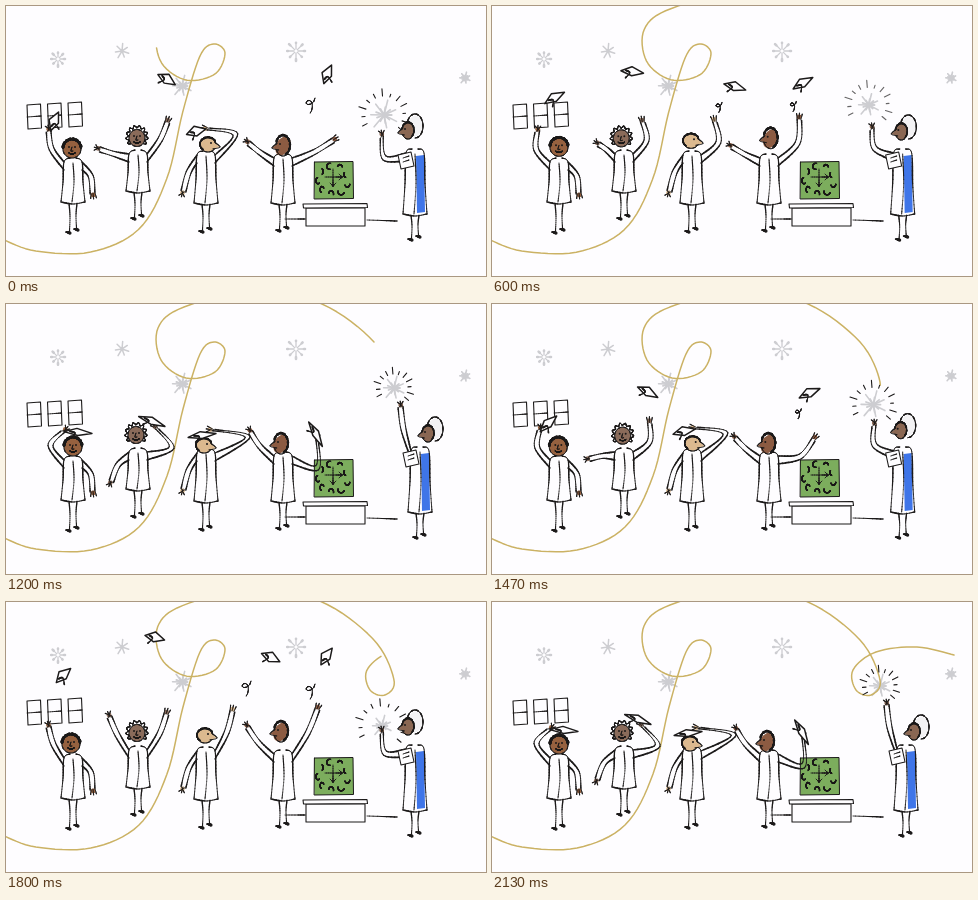
Animation of 480x270 px, one loop 2190 ms. Source, as an HTML page with a canvas:

```html
<!DOCTYPE html>
<html lang="en">
<head>
<meta charset="utf-8">
<title>Graduates</title>
<style>
html, body { margin: 0; width: 100%; height: 100%; overflow: hidden; background: #fefdff; }
canvas { display: block; width: 480px; height: 270px; }
</style>
</head>
<body>
<canvas width="480" height="270"></canvas>
<script>
const LOOP = 2190, PI = Math.PI, PAPER = '#fefdff', INK = '#1c1a1a', GREY = '#cdcdd1', GOLD = '#cbb264';
const ctx = document.querySelector('canvas').getContext('2d');
ctx.lineCap = ctx.lineJoin = 'round';

const lerp = (a, b, u) => a + (b - a) * u;
const range = (n, f) => Array.from({ length: n }, (_, i) => f(i));
let seed;
const random = () => (seed = seed * 16807 % 2147483647) / 2147483647;

// ---- Pen ----

// Smooth curve through flat x, y points, sampled up to the fractional index `end`.
function spline(xy, end = xy.length / 2 - 1) {
  const last = xy.length / 2 - 1, at = (i, c) => xy[2 * Math.max(0, Math.min(last, i)) + c];
  const point = t => [0, 1].map(c => {
    const i = Math.min(last - 1, Math.floor(t)), u = t - i;
    const [a, b, d, e] = [-1, 0, 1, 2].map(n => at(i + n, c));
    return b + u / 2 * (d - a + u * (2 * a - 5 * b + 4 * d - e + u * (3 * (b - d) + e - a)));
  });
  const steps = Math.ceil(end * 8);
  return range(steps + 1, i => point(end * i / steps));
}

// Brush line whose weight swells and thins along its length.
function pen(xy, width = 1.2, color = INK) {
  const pts = spline(xy);
  ctx.strokeStyle = color;
  for (let i = 1; i < pts.length; i++) {
    ctx.lineWidth = width * (1 + .3 * Math.sin(i * .45 + xy.length));
    ctx.beginPath();
    ctx.moveTo(...pts[i - 1]);
    ctx.lineTo(...pts[i]);
    ctx.stroke();
  }
}

function poly(points, fill = PAPER, width = 1.1) {
  ctx.beginPath();
  points.forEach(p => ctx.lineTo(...p));
  ctx.closePath();
  ctx.fillStyle = fill;
  ctx.fill();
  if (!width) return;
  ctx.strokeStyle = INK;
  ctx.lineWidth = width;
  ctx.stroke();
}
const box = (x, y, w, h, tilt, ...style) => poly([[x, y], [x + w, y - tilt], [x + w + tilt, y + h - tilt], [x + tilt, y + h]], ...style);

function blob(x, y, rx, ry, color, tilt = 0) {
  ctx.beginPath();
  ctx.ellipse(x, y, rx, ry, tilt, 0, 2 * PI);
  ctx.fillStyle = color;
  ctx.fill();
}

// Arc in units of pi, optionally curly.
function arc(x, y, rx, ry, from, to, width = 1, curls = 0) {
  const n = curls ? 40 : 14;
  pen(range(n + 1, i => {
    const a = PI * lerp(from, to, i / n), r = 1 + .12 * Math.sin(curls * a);
    return [x + rx * r * Math.cos(a), y + ry * r * Math.sin(a)];
  }).flat(), width);
}

function rays(x, y, inner, outer, count, color, width, from = 0, sweep = 2) {
  ctx.beginPath();
  for (let i = 0; i < count; i++) {
    const a = PI * (from + sweep * i / count), r = outer * (1 + .1 * Math.sin(i * 4));
    ctx.moveTo(x + inner * Math.cos(a), y + inner * Math.sin(a));
    ctx.lineTo(x + r * Math.cos(a), y + r * Math.sin(a));
  }
  ctx.strokeStyle = color;
  ctx.lineWidth = width;
  ctx.stroke();
}

// ---- Poses: swing, throw, wear, lift ----

let pose = 0;
function now(track) {
  const i = Math.floor(pose), a = track[i % 4] || track[0], b = track[(i + 1) % 4] || track[0];
  return a.map((n, c) => lerp(n, b[c], pose - i));
}

// Hands are x, y and elbow bend; caps x, y, angle; curls x, y, size; hair arc from, to, width, curls.
const people = [
  { x: [[67]], top: 156, hem: 196, foot: 225, skin: '#96613f', face: 0, size: [9, 9], hair: [1, 2, 2.4, 0],
    head: [[66, 143], [65, 142], [71, 140], [67, 143]],
    left: [[43, 125, 5], [43, 125, 3], [51, 126, 17], [58, 127, 13]],
    right: [[87, 187, -4]],
    cap: [[48, 115, -1.1], [57, 73, -.7], [73, 128, 0], [72, 128, .1]] },
  { x: [[132]], top: 148, hem: 185, foot: 211, skin: '#8a6b5a', face: 0, size: [8, 8.5], hair: [.75, 2.25, 1, 13],
    head: [[131, 132], [131, 131], [126, 135], [130, 131]],
    left: [[94, 143, 2], [104, 115, 2], [113, 184, -3], [105, 177, -3]],
    right: [[161, 116, 3], [160, 112, 3], [131, 124, 20], [150, 124, 21]],
    cap: [[161, 73, .6], [149, 35, .3], [123, 126, -.1], [146, 117, .4]] },
  { x: [[200]], top: 149, hem: 197, foot: 224, skin: '#dcb98f', face: 1, size: [8, 7], hair: [.7, 1.9, 1.3, 0],
    head: [[202, 139], [199, 134], [199, 138], [198, 142]],
    left: [[177, 185, -2]],
    right: [[201, 123, 25], [226, 109, 3], [215, 128, 27], [206, 126, 34]],
    cap: [[190, 125, -.2], [265, 55, .5], [199, 131, 0], [196, 131, -.1]],
    curl: [[190, 125, 0], [240, 84, 1], [200, 131, 0], [200, 131, 0]] },
  { x: [[277]], top: 152, hem: 197, foot: 223, skin: '#8c5b42', face: -1, size: [7, 10], hair: [1.1, 2.4, 1.8, 0], tilt: .5,
    head: [[277, 140], [275, 130], [286, 138], [275, 140]],
    left: [[243, 137, 2], [242, 125, 3], [236, 171, 0], [245, 128, 3]],
    right: [[327, 134, 3], [311, 107, 3], [299, 125, 23], [311, 136, 23]],
    cap: [[321, 68, -1.1], [320, 54, -.9], [292, 122, .4], [310, 130, 1.1]],
    curl: [[304, 97, 1], [304, 87, 1], [295, 122, 0], [310, 130, 0]] },
  { x: [[409], [409], [414], [414]], top: 147, hem: 208, foot: 232, skin: '#8a6753', face: -1, size: [6, 8], hair: [1, 2.3, 1.2, 0], teacher: true,
    head: [[402, 125], [402, 125], [424, 128], [422, 130]],
    left: [[376, 130, 16], [376, 130, 15], [389, 108, 2], [395, 103, 2]] },
];

function arm(side, x, y, [hx, hy, bend], skin) {
  const dx = hx - x, dy = hy - y, len = Math.hypot(dx, dy);
  const nx = -side * dy / len, ny = side * dx / len;
  const ex = (x + hx) / 2 + nx * bend, ey = (y + hy) / 2 + ny * bend;
  for (const edge of [-2, 3])
    pen([x, edge < 0 ? y : y + 8, ex + nx * edge, ey + ny * edge, hx + nx * edge, hy + ny * edge], 1.3);
  const aim = Math.atan2(hy - ey, hx - ex);
  blob(hx + 2 * Math.cos(aim), hy + 2 * Math.sin(aim), 2.4, 2.4, skin);
  for (const spread of [-.5, 0, .5])
    pen([hx + nx * spread * 4, hy + ny * spread * 4, hx + 6 * Math.cos(aim + spread), hy + 6 * Math.sin(aim + spread)], .9);
}

function drawHead(x, y, { skin, face, size: [rx, ry], hair, tilt = 0, teacher }) {
  if (teacher) {
    blob(x + 7, y - 5, 8, 11, '#f3f2f4', .3);
    arc(x + 7, y - 5, 8, 12, .9, 2.5, 1.1);
  }
  blob(x, y, rx, ry, skin, tilt);
  arc(x, y, rx, ry, 0, 2, .8);
  arc(x, y - 1, rx + hair[3] * .15, ry + hair[3] * .15, ...hair);
  if (face) {
    const tip = [x + face * (rx + 4), y + 2];
    poly([[x + face * rx * .7, y - 3], tip, [x + face * rx * .6, y + 4]], skin, 0);
    pen([x + face * rx * .8, y - 3, ...tip, x + face * rx * .6, y + 4], .9);
  } else {
    pen([x, y - 2, x - 1, y + 2, x + 1, y + 2], .8);
    arc(x, y + 2, 4, 3, .2, .8, .9);
    blob(x - 3, y - 2, 1, 1, INK);
  }
  blob(x + (face || 1) * 3, y - 2, 1, 1, INK);
}

function drawCap([x, y, angle]) {
  const flight = now([[1], [1], [0], [0]])[0], w = lerp(14, 10, flight), h = lerp(3.5, 5, flight);
  ctx.save();
  ctx.translate(x, y);
  ctx.rotate(angle);
  poly([[-w, h * .3], [-w * .1, -h], [w, 0], [0, h]], PAPER, 1.5);
  pen([-w * .6, 0, -w * .2, h * .4, -w * .5, h + 3], 1.4);
  ctx.restore();
}

function drawCurl([x, y, size]) {
  if (size < .1) return;
  pen(range(12, i => [x + size * (5 - i * .3) * Math.cos(i * .7), y + size * (i - 5 + 4 * Math.sin(i * .7))]).flat(), .9);
}

function drawPerson(p) {
  const [x] = now(p.x), [hx, hy] = now(p.head), { top, hem, foot } = p;
  if (p.teacher) box(x + 1, top + 3, 8, hem - top - 4, 1, '#3f75e8', 0);
  for (const side of [-1, 1]) {
    pen([x + side * 3, top - 4, x + side * 9, top, x + side * 10, (top + hem) / 2, x + side * 12, hem]);
    const end = foot - (side > 0 ? 3 : 0);
    pen([x + side * 4, hem + 1, x + side * 3, (hem + end) / 2, x + side * 3.5, end], 1);
    pen([x + side * 4 - 3, end + 1, x + side * 4 + 1, end + 2], 2.4);
  }
  pen([x - 12, hem, x, hem + 2, x + 12, hem]);
  pen([x, top + 1, x + 1, lerp(top, hem, .5), x - 1, hem], .9);
  drawHead(hx, hy, p);
  arm(-1, x - 9, top, now(p.left), p.skin);
  if (p.right) arm(1, x + 9, top, now(p.right), p.skin);
  if (p.cap) drawCap(now(p.cap));
  if (p.curl) drawCurl(now(p.curl));
  if (p.teacher) {
    box(x - 17, top + 2, 13, 14, 3);
    for (const line of [5, 9]) pen([x - 12, top + line, x - 6, top + line - 2], .9);
  }
}

// ---- Scene ----

function drawRoom() {
  for (let i = 0; i < 3; i++) {
    const x = 21 + i * 20.5, y = 99 - i;
    box(x, y, 13.5, 24, 1);
    pen([x, y + 12, x + 14, y + 11], 1);
  }
  pen([279, 213, 299, 213]);
  pen([361, 214, 391, 215]);
  box(300, 202, 59, 18, 0);
  box(297, 198, 64, 4, .5);
  box(308, 156, 39, 37, .5, '#7cad5d', 1);
  for (const [x, y] of [[1, 0], [0, 1]]) {
    pen([327 - 8 * x, 171 - 8 * y, 327 + 9 * x, 171 + 9 * y]);
    for (const s of [-3, 3]) pen([327 + 6 * x + s * y, 171 + 6 * y + s * x, 327 + 9 * x, 171 + 9 * y], 1);
  }
  seed = 11;
  for (let i = 0; i < 9; i++) {
    const a = i * 2 * PI / 9 + .3, start = 2 * random();
    arc(327 + 15 * Math.cos(a), 174 + 14 * Math.sin(a), 1.5 + 2 * random(), 3, start, start + .6 + random(), 1.1);
  }
}

function dottedFlake(x, y, r) {
  rays(x, y, 2, r, 8, GREY, 1.3);
  rays(x, y, r - 1, r, 8, GREY, 2.6);
}
function scribbleStar(x, y, r) {
  rays(x, y, 0, r, 7, GREY, 1.6, .15);
  rays(x, y, 0, r * .55, 9, GREY, 1.8);
}

const ribbon = [-2, 234, 30, 245, 85, 246, 133, 223, 161, 172, 177, 105, 194, 50, 208, 38, 219, 47, 209, 68, 180, 74,
  155, 56, 152, 24, 178, 3, 250, -14, 316, 0, 368, 38, 388, 78, 379, 93, 364, 88, 361, 68, 384, 50, 425, 45, 462, 53];

function drawRibbon(end) {
  ctx.beginPath();
  spline(ribbon, end).forEach(p => ctx.lineTo(...p));
  ctx.strokeStyle = GOLD;
  ctx.lineWidth = 1.5;
  ctx.stroke();
}

// The star the teacher catches: x, y, radius, spark distance, spark opacity
const star = [[378, 109, 14, 19, 1], [376, 124, 10, 20, 1], [378, 49, 12, 13, 0], [388, 84, 11, 14, 1]];

// Step -> ribbon point reached, and step -> running pose
const ribbonKeys = [[0, 11.45], [5, 14.3], [16, 14.9], [18, 16], [23, 17.4], [27, 20.7], [32, 23]];
const poseKeys = [[0, 0], [3, 1], [8, 1], [11, 2], [13, 2], [16, 3], [20, 3], [23, 4], [24, 4], [27, 5], [28, 5], [30, 6], [32, 7]];
function sample(keys, k) {
  const i = Math.max(1, keys.findIndex(p => p[0] >= k)), [a, b] = [keys[i - 1], keys[i]];
  return lerp(a[1], b[1], (k - a[0]) / (b[0] - a[0]));
}

function frame(time) {
  const step = Math.min(32, Math.floor((time % LOOP + 5) / 66.6));
  pose = sample(poseKeys, step);
  ctx.fillStyle = PAPER;
  ctx.fillRect(0, 0, 480, 270);

  dottedFlake(52, 53, 7);
  dottedFlake(290, 45, 9);
  rays(116, 45, 0, 7, 7, GREY, 1.5, .1);
  scribbleStar(176, 80, 10);
  scribbleStar(459, 72, 5.5);
  const [x, y, r, gap, glow] = now(star);
  scribbleStar(x, y, r);
  drawRibbon(sample(ribbonKeys, step));
  ctx.globalAlpha = glow;
  rays(x, y, gap, gap + 5, 12, INK, 1.1, .85, 1.5);
  ctx.globalAlpha = 1;
  drawRoom();
  people.forEach(drawPerson);
  requestAnimationFrame(frame);
}
requestAnimationFrame(frame);
</script>
</body>
</html>
```
